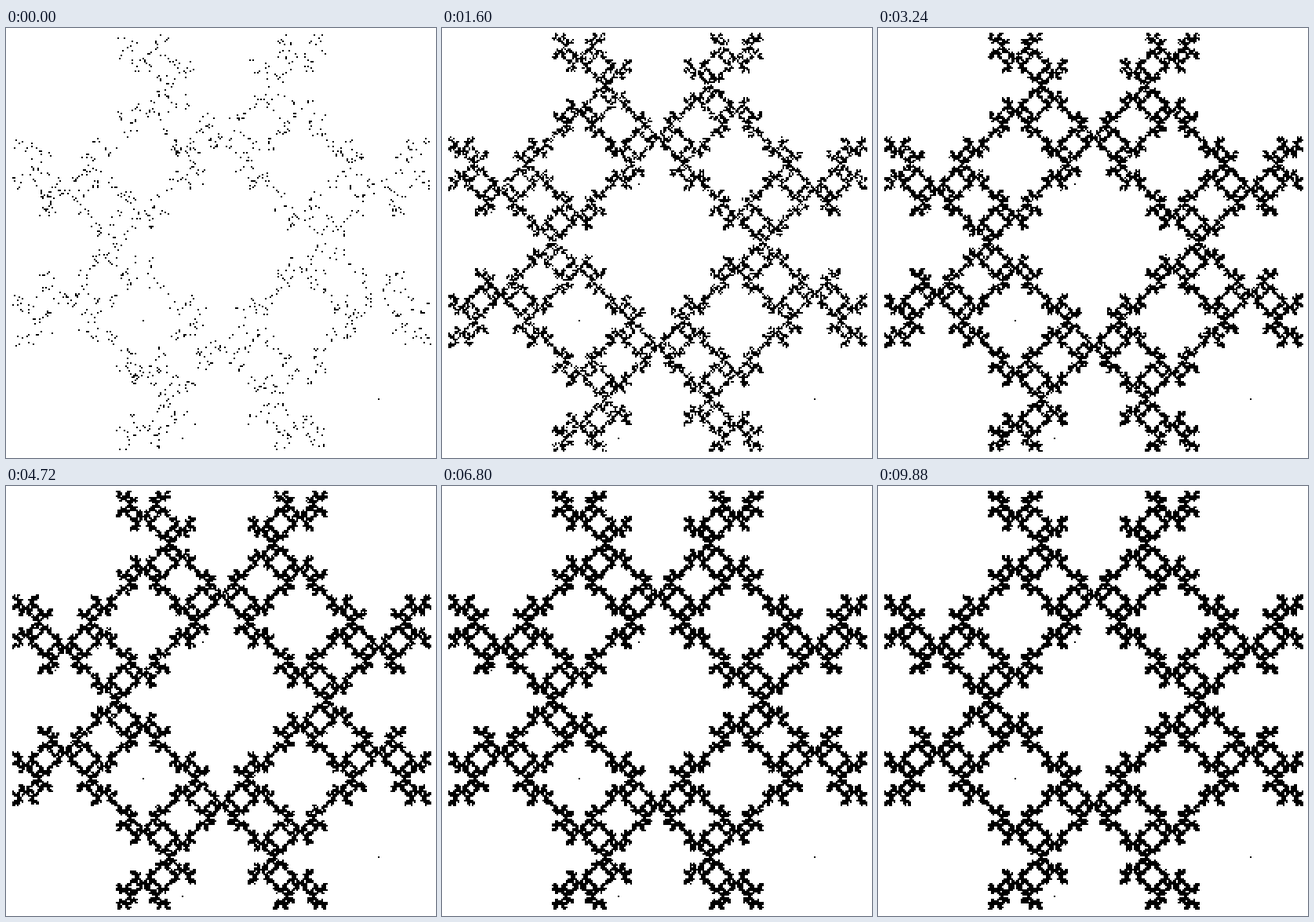
These frames come from a looping animation (548x548 px, 9.92 s). An HTML page with a canvas:

```html
<!DOCTYPE html>
<html>
<head>
<meta charset="utf-8">
<style>
html, body { margin: 0; background: #fff; overflow: hidden; }
canvas { display: block; }
</style>
</head>
<body>
<canvas id="stage" width="548" height="548"></canvas>
<script>
// Chaos game on a diamond: move halfway to a corner, never the same corner twice in a row.
const LOOP = 9920, STEP = 40, FIRST_POINTS = 1500, POINTS_PER_STEP = 500, CELL = 2;
const CENTER = { x: 137, y: 136 };
const CORNERS = [[200, 0], [0, 200], [-200, 0], [0, -200]];
const OPENING = [2, 1, 3, 2];
const ctx = document.getElementById('stage').getContext('2d');
let x, y, corner, seed, plotted;

function random() {
  seed = (seed + 0x6D2B79F5) | 0;
  let t = Math.imul(seed ^ (seed >>> 15), 1 | seed);
  t = (t + Math.imul(t ^ (t >>> 7), 61 | t)) ^ t;
  return ((t ^ (t >>> 14)) >>> 0) / 4294967296;
}

function plot() {
  ctx.fillRect(CELL * Math.round(CENTER.x + x), CELL * Math.round(CENTER.y + y), CELL, CELL);
  plotted++;
}

function reset() {
  ctx.fillStyle = '#fff';
  ctx.fillRect(0, 0, 548, 548);
  ctx.fillStyle = '#000';
  x = y = 100;
  seed = 7;
  plotted = 0;
  plot();
}

function jump() {
  corner = OPENING[plotted - 1] ?? (corner + 1 + Math.floor(random() * 3)) % 4;
  x = (x + CORNERS[corner][0]) / 2;
  y = (y + CORNERS[corner][1]) / 2;
  plot();
}

function draw() {
  const step = Math.floor((performance.now() % LOOP) / STEP);
  const wanted = FIRST_POINTS + step * POINTS_PER_STEP;
  if (wanted < plotted) reset();
  while (plotted < wanted) jump();
  requestAnimationFrame(draw);
}

reset();
draw();
</script>
</body>
</html>
```
